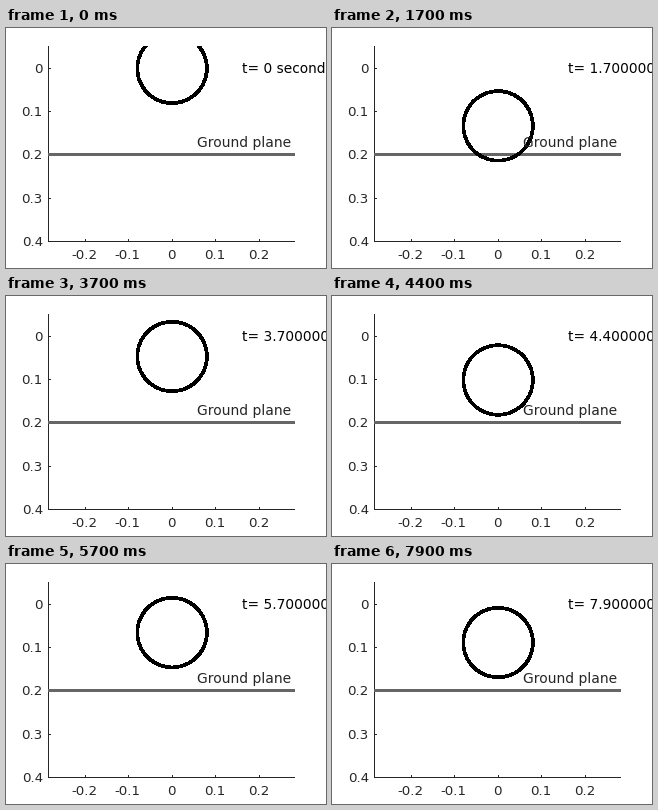
These frames come from a looping animation (320x240 px, 8000 ms). A matplotlib script:

```python
import numpy as np
import matplotlib.pyplot as plt
from matplotlib.animation import FuncAnimation
from matplotlib.patches import Circle, Rectangle

W, H, DPI = 320, 240, 100
PX = 72 / DPI                      # one pixel in points
X0, Y0, SCALE = 166.1, 40.05, 434.7   # data origin and pixels per unit
BALL_Y = 40.35                     # release point of the ball's centre
LEFT, RIGHT, TOP, BOTTOM = 42, 289, 18, 213
RADIUS, GROUND = 0.08, 0.2
GRAVITY, REBOUND = 0.0944, 0.837
CONTACT, SOFTNESS = 0.302, 0.092   # contact time, depth per unit of speed
DT, FRAMES = 0.1, 80
INK = "0.15"

plt.rcParams["font.family"] = "DejaVu Sans"
fig = plt.figure(figsize=(W / DPI, H / DPI), dpi=DPI, facecolor="white")
ax = fig.add_axes([0, 0, 1, 1])
ax.set(xlim=(0, W), ylim=(H, 0))
ax.axis("off")


def line(xs, ys, width=1, color=INK):
    """Straight line; whole coordinates name the pixel's left or top edge."""
    ax.fill_between([min(xs), max(xs) + (xs[0] == xs[1])],
                    min(ys) - (width - 1) / 2,
                    max(ys) + (width + 1) / 2 if ys[0] == ys[1] else max(ys),
                    color=color, lw=0, zorder=2)


def label(x, y, text, size=13.4, color=INK, ha="left"):
    return ax.text(x, y, text, fontsize=size * PX, color=color, ha=ha,
                   va="baseline", zorder=5)


def height(t):
    """Depth of the ball's centre below its release point."""
    floor = GROUND - RADIUS
    fall = np.sqrt(2 * floor / GRAVITY)
    if t < fall:
        return GRAVITY * t * t / 2
    speed = GRAVITY * fall
    t -= fall
    while True:
        if t < CONTACT:
            return floor + SOFTNESS * speed * np.sin(np.pi * t / CONTACT)
        t -= CONTACT
        speed *= REBOUND
        flight = 2 * speed / GRAVITY
        if t < flight:
            return floor - speed * t + GRAVITY * t * t / 2
        t -= flight


line([LEFT, LEFT], [TOP, BOTTOM + 1])
line([LEFT, RIGHT], [BOTTOM, BOTTOM])

for text in ("-0.2", "-0.1", "0", "0.1", "0.2"):
    x = int(X0 + float(text) * SCALE)
    line([x, x], [BOTTOM - 2, BOTTOM])
    label(x - 0.5, 231, text, ha="center")

for text in ("0", "0.1", "0.2", "0.3", "0.4"):
    y = int(Y0 + float(text) * SCALE)
    line([LEFT, LEFT + 3], [y, y])
    label(36.8, y + 5, text, ha="right")

ground = int(Y0 + GROUND * SCALE)
line([LEFT, RIGHT], [ground, ground], width=3, color="0.4")
label(191, 119, "Ground plane", size=13.85)
clock = label(235.7, 45, "", size=13.8, color="black")

ball = Circle((X0, BALL_Y), RADIUS * SCALE, fill=False, ec="black",
              lw=2.6 * PX, antialiased=False, zorder=4)
ax.add_patch(ball)
view = Rectangle((LEFT, TOP), RIGHT - LEFT, BOTTOM - TOP,
                 transform=ax.transData)
ball.set_clip_path(view)


def draw(i):
    t = i * DT
    ball.center = X0, BALL_Y + height(t) * SCALE
    clock.set_text(f"t= {t:e} seconds" if i else "t= 0 seconds")
    return ball, clock


anim = FuncAnimation(fig, draw, frames=FRAMES, interval=100,
                     repeat=True, repeat_delay=0)
plt.show()
```
